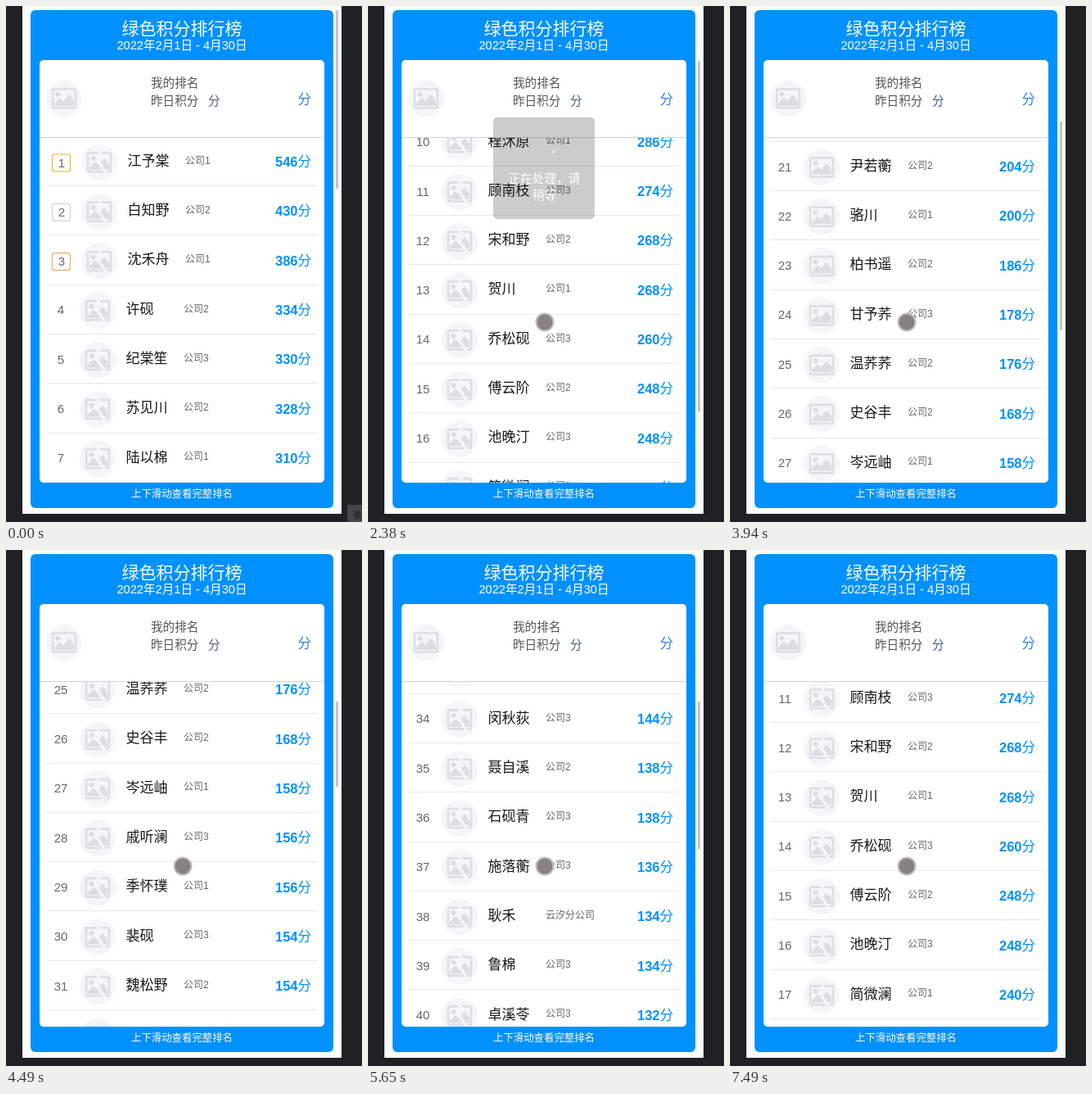
An HTML page for the animation above (8 s loop, 435 by 630 pixels).

```html
<!DOCTYPE html>
<html lang="zh-CN">
<head>
<meta charset="utf-8">
<style>
html, body { margin: 0; width: 100%; height: 100%; overflow: hidden; background: #212123; }
svg { display: block; width: 435px; height: 630px; }
text { font-family: "Liberation Sans", Arial, "Noto Sans CJK SC", "Noto Sans CJK", sans-serif; white-space: pre; }
.wait .late .tear { display: none; }
</style>
</head>
<body>
<svg id="stage" viewBox="0 0 435 630">
  <defs>
    <clipPath id="listClip"><rect x="41" y="161" width="348" height="421"/></clipPath>
    <clipPath id="phoneClip"><rect x="20" width="390" height="620"/></clipPath>
    <g id="photo">
      <circle r="22" fill="#f5f6f8"/>
      <rect x="-14" y="-11.5" width="28" height="23" rx="2" fill="none" stroke="#dcdfe2" stroke-width="2.6"/>
      <circle cx="-7.5" cy="-5" r="3" fill="#dcdfe2"/>
      <path d="M-12 9V6l7-7 4 4 7-8 6 7v7z" fill="#dcdfe2"/>
    </g>
    <path id="crack" d="M0-14l4 8-5 5 10 15" fill="none" stroke="#f5f6f8" stroke-width="3.5"/>
  </defs>
  <g id="corner"><rect x="417" y="609" width="18" height="21" fill="#47474b"/></g>
  <rect x="20" width="390" height="620" fill="#fafbfb"/>
  <rect x="30" y="5" width="370" height="608" rx="6" fill="#0091ff"/>
  <rect x="41" y="66" width="348" height="516" rx="5" fill="#fefefe"/>
  <g id="head"></g>
  <g clip-path="url(#listClip)"><g id="list"></g></g>
  <path d="M41 160.5H389" stroke="#d3d3d3"/>
  <rect id="thumb" x="403" width="3" fill="#c2c4c6"/>
  <g id="toast">
    <rect x="153" y="136" width="124" height="124" rx="5" fill="#111" fill-opacity=".73"/>
    <path d="M226.5 176v4" stroke="#ddd" stroke-width="2"/>
  </g>
  <g clip-path="url(#phoneClip)">
    <circle id="touch" r="10.5" fill="#868284" stroke="#bfbfbf" stroke-width="2"/>
  </g>
</svg>
<script>
const $ = id => document.getElementById(id);
const LOOP = 8000, PITCH = 60.3, BLUE = '#0091ff';

// Name, branch, points
const people = `江予棠 1 546,白知野 2 430,沈禾舟 1 386,许砚 2 334,纪棠笙 3 330,苏见川 2 328,陆以棉 1 310,叶闻笛 2 302,
方栖迟 3 294,程沐原 1 286,顾南枝 3 274,宋和野 2 268,贺川 1 268,乔松砚 3 260,傅云阶 2 248,池晚汀 3 248,
简微澜 1 240,祝青梧 2 232,阮星洄 1 220,庄牧禾 3 212,尹若蘅 2 204,骆川 1 200,柏书遥 2 186,甘予荞 3 178,
温荞荞 2 176,史谷丰 2 168,岑远岫 1 158,戚听澜 3 156,季怀璞 1 156,裴砚 3 154,魏松野 2 154,虞采苓 3 150,
桑知时 1 150,闵秋荻 3 144,聂自溪 2 138,石砚青 3 138,施落蘅 3 136,耿禾 云汐分公司 134,鲁棉 3 134,卓溪苓 3 132`
  .split(',').map(line => line.trim().split(' '));
const medals = ['#ecb52f', '#d2d2d2', '#e6b066'];

// Text centred vertically on y
const label = (x, y, size, fill, str, anchor = 'start') =>
  `<text x="${x}" y="${y + size * .37}" font-size="${size}" fill="${fill}" text-anchor="${anchor}">${str}</text>`;

function row([name, branch, points], i) {
  const y = 190 + i * PITCH, dx = i < 3 ? 2 : 0;
  const medal = medals[i] ? `<rect x="56.5" y="${y - 9}" width="22" height="21" rx="3" fill="none" stroke="${medals[i]}" stroke-width="1.2"/>` : '';
  return `<g class="${i >= 20 ? 'late' : ''}">${medal}
    ${label(67 + dx / 2, y + dx / 2, 15, '#666', i + 1, 'middle')}
    <g transform="translate(${112 + dx} ${y + 1})"><use href="#photo"/><use class="tear" href="#crack"/></g>
    ${label(146.5 + dx, y - 1.4, 17, '#181818', name)}
    ${label(217 + dx, y - 1.8, 12, '#666', branch.length > 1 ? branch : '公司' + branch)}
    ${label(373, y, 16.5, BLUE, `<tspan font-weight="bold">${points}</tspan>分`, 'end')}
    <path d="M49 ${Math.round(y + 29) + .5}H381" stroke="#e8e8e8"/></g>`;
}

$('list').innerHTML = people.map(row).join('');
$('head').innerHTML =
  label(215, 27, 21, '#fff', '绿色积分排行榜', 'middle') +
  label(215, 48, 14.6, '#fff', '2022年2月1日 - 4月30日', 'middle') +
  '<use href="#photo" x="71" y="113"/>' +
  label(177, 93.5, 14.6, '#555', '我的排名') +
  label(177, 115.5, 14.6, '#555', '昨日积分') +
  label(247, 115.5, 14.6, '#4f5f78', '分') +
  label(373, 113.4, 16.5, '#3585dc', '分', 'end') +
  label(215, 595.6, 12.4, '#fff', '上下滑动查看完整排名', 'middle');
$('corner').innerHTML += label(423, 622, 12, '#1d1d1f', '录');
$('toast').innerHTML += label(215.5, 211, 14.7, '#fff', '正在处理，请', 'middle') + label(215.5, 231, 14.7, '#fff', '稍等', 'middle');

const ramp = (t, a, b) => Math.min(1, Math.max(0, (t - a) / (b - a)));
const pulse = (t, a, b, fade) => Math.min(ramp(t, a, a + fade), 1 - ramp(t, b - fade, b));
const easeOut = u => u * (2 - u);

// Swipes: start, end, resulting scroll
const swipes = [[1397, 1840, 130], [2080, 2380, 567], [3300, 3610, 1200], [4060, 4300, 1400],
  [4460, 4780, 1762], [5280, 5390, 1988], [5641, 5790, 1880], [6080, 6880, 612]];
const scrollAt = t => swipes.reduce((s, [a, b, to]) => s + (to - s) * easeOut(ramp(t, a, b)), 0);

// The thumb smears from its last resting place: since, rest scroll, rows loaded
const rests = [[0, 0, 20], [2080, 130, 20], [2650, 567, 40], [4000, 1200, 64]];
function thumbAt(t, scroll) {
  const [, rest, rows] = rests.findLast(r => r[0] <= t);
  const pos = s => 5 + s * 9.6 / rows;
  const top = pos(Math.min(rest, scroll));
  return [top, pos(Math.max(rest, scroll)) + (rows > 20 ? 4100 : 4360) / rows - top];
}

function draw() {
  const t = performance.now() % LOOP;
  const scroll = Math.round(scrollAt(t));
  const [top, height] = thumbAt(t, scroll);
  const enter = ramp(t, 20, 620), press = easeOut(ramp(t, 900, 1090));
  $('list').setAttribute('transform', `translate(0 ${-scroll})`);
  $('thumb').setAttribute('y', top);
  $('thumb').setAttribute('height', height);
  $('thumb').setAttribute('opacity', 1 - pulse(t, 2790, 3330, 200) - ramp(t, 6700, 6880));
  $('toast').setAttribute('opacity', pulse(t, 2350, 2720, 110) + pulse(t, 4760, 5250, 110));
  $('touch').setAttribute('transform', `translate(${435 - 142 * enter - 77 * press} ${645 - 224 * enter - 35 * press})`);
  $('corner').setAttribute('opacity', 1 - ramp(t, 70, 280));
  $('stage').classList.toggle('wait', t < 4080);
  requestAnimationFrame(draw);
}
draw();
</script>
</body>
</html>
```
